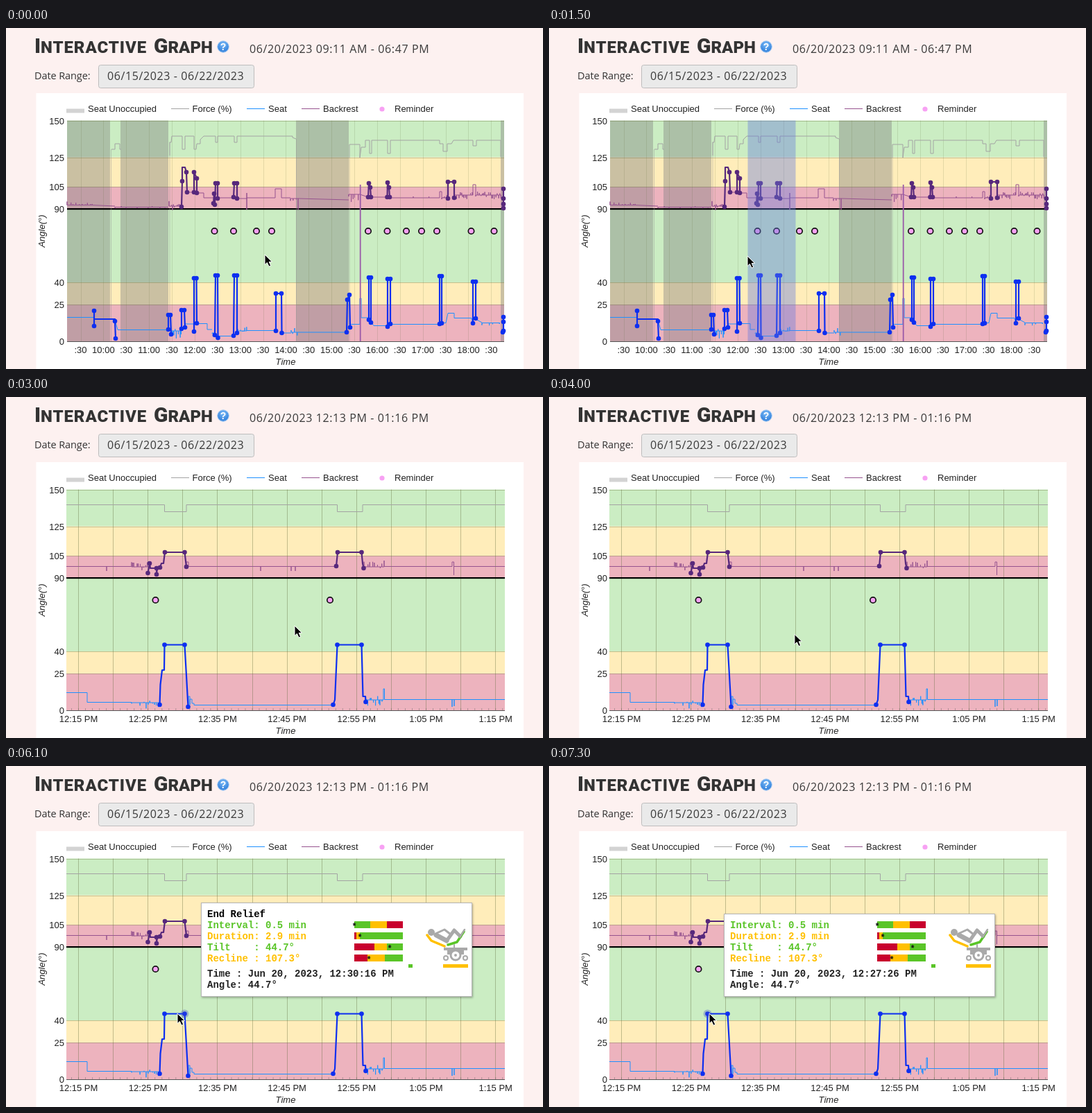
Write an HTML page that moves like this. It is 774 by 492 pixels and loops after 7400 ms.

```html
<!DOCTYPE html>
<html lang="en">
<head>
<meta charset="utf-8">
<title>Interactive Graph</title>
<style>
html, body { margin: 0; width: 100%; height: 100%; overflow: hidden; background: #fdf1f0; }
svg { display: block; width: 774px; height: 492px; font: 13px "Liberation Sans", Arial, sans-serif; fill: #222; }
.title { font: 900 24px Roboto, sans-serif; fill: #333; }
.big { font-size: 30px; }
.info { font: 16px "Open Sans", sans-serif; letter-spacing: .6px; fill: #3a3a3a; }
.label { font: 14.5px "Open Sans", sans-serif; letter-spacing: -.1px; fill: #333; }
.mid { text-anchor: middle; }
.end { text-anchor: end; }
.axis { font-style: italic; }
.tip text { font: bold 14px "Liberation Mono", "Courier New", monospace; white-space: pre; }
.thin { fill: none; stroke-width: 1; }
.thick { fill: none; stroke-width: 2.2; stroke-linejoin: round; }
</style>
</head>
<body>
<svg id="stage" viewBox="0 0 774 492"></svg>
<script>
const GRAY = '#a3a3a3', SKY = '#1e90ff', BLUE = '#0d2ff0', MAUVE = '#96538f', PURPLE = '#57287c';
const RED = '#c8002d', AMBER = '#ffc000', GREEN = '#5ac528';
const TOP = 133.5, BOTTOM = 452;
const yOf = angle => BOTTOM - angle * (BOTTOM - TOP) / 150;

let seed = 7;
const random = () => (seed = seed * 16807 % 2147483647) / 2147483647;

const rect = (x, y, w, h, fill, more = '') => `<rect x="${x}" y="${y}" width="${w}" height="${h}" fill="${fill}" ${more}/>`;
const text = (x, y, s, cls = '', more = '') => `<text x="${x}" y="${y}" class="${cls}" ${more}>${s}</text>`;
const circle = (x, y, r, fill, more = '') => `<circle cx="${x}" cy="${y}" r="${r}" fill="${fill}" ${more}/>`;
const thin = (color, d, more = '') => `<path class="thin" stroke="${color}" d="${d}" ${more}/>`;

// Path commands for a flat line with random spikes above and below it.
function jitter(x0, x1, base, up, down, step) {
  let d = `M${x0} ${base}`;
  for (let x = x0; x < x1; x += step * (.5 + random())) {
    d += `H${x.toFixed(1)}V${(base - up + random() * (up + down)).toFixed(1)}V${base}`;
  }
  return d + `H${x1}`;
}

// Thick polyline with dots; a point marked with ~ has no dot.
function run(color, points) {
  const list = points.split(' ');
  const dots = list.filter(p => p[0] !== '~').map(p => circle(...p.split(','), 3.3, color));
  return `<polyline class="thick" stroke="${color}" points="${points.replaceAll('~', '')}"/>${dots.join('')}`;
}
const runs = (color, list) => list.map(p => run(color, p)).join('');
const reminders = xs => xs.map(x => circle(x, 293, 4.2, '#f7a1f3', 'stroke="#111" stroke-width="1.7"')).join('');

function plot(x0, x1, gridStart, gridStep, gridAlpha, shades = []) {
  const bands = [[125, 150, '#cbedc3'], [105, 125, '#ffedba'], [90, 105, '#edb3be'],
                 [40, 90, '#cbedc3'], [25, 40, '#ffedba'], [0, 25, '#edb3be']];
  let out = bands.map(([a, b, c]) => rect(x0, yOf(b), x1 - x0, yOf(a) - yOf(b), c)).join('');
  out += shades.map(([a, b]) => rect(a, TOP, b - a, BOTTOM - TOP, 'rgba(130,130,130,.42)')).join('');
  let grid = '';
  for (const a of [150, 125, 105, 40, 25]) grid += `M${x0} ${Math.round(yOf(a)) + .5}H${x1}`;
  out += thin('rgba(105,115,60,.38)', grid);
  grid = '';
  for (let x = gridStart; x < x1; x += gridStep) grid += `M${Math.round(x) + .5} ${TOP}V${BOTTOM}`;
  out += thin(`rgba(95,105,60,${gridAlpha})`, grid);
  out += thin('#555', `M${x0} 452.5H${x1}`);
  return out + rect(x0, 260, x1 - x0, 2.2, '#000');
}

function overview() {
  let out = plot(88, 718, 107.5, 32.88, .17, [[88, 150], [165, 234], [418, 494], [713, 718]]);
  for (let i = 0; i < 19; i++) {
    out += text(107.5 + i * 32.88, 469, i % 2 ? `${10 + (i - 1) / 2}:00` : ':30', 'mid');
  }
  out += thin('rgba(150,150,150,.45)', 'M151.5 175V452M236 164V452M418.5 160V452M495 187V452');
  out += thin(GRAY, 'M152 175H157V167H164V175H166M236 184V165H238L239 156H254V175H258V156H271V175H274L275 167H280V161L285 156' +
    'H302V165H305V156H329V165H333V156H413V158L418 160M495 187V168H510V187L512 172H518V162H524V181H527V162' +
    'H550V181H554V162H625V167H630V178H636V167H642L645 162H673V170H678V162H713V186');
  out += thin(MAUVE, jitter(88, 125, 255.5, 5, 0, 4) + 'L157 257' + jitter(157, 234, 258.5, 2, 2, 7) +
    jitter(235, 253, 257, 8, 7, 2) + 'M261 237H271M275 238H285V245H299M306 245H328M334 246H347V238V262V245H388V232H397V245H410' +
    jitter(410, 421, 246, 3, 4, 4) + 'V262V246L494 248' + jitter(494, 510, 240, 6, 12, 3) + 'M510 240L522 244H550' +
    jitter(554, 624, 245, 2, 0, 25) + 'H625V236H628V245' + jitter(628, 637, 245, 5, 2, 3) +
    jitter(646, 673, 241, 4, 7, 2.5) + 'V226H677V241' + jitter(677, 714, 241, 5, 6, 1.8));
  out += thin(SKY, 'M88 417.5H127M158 425L161 435.5H234' + jitter(238, 253, 437, 6, 11, 2) + 'M258 432V427H271M275 426.5H290V435H297' +
    jitter(297, 301, 440, 8, 9, 1.3) + 'M306 444.5H328' + jitter(334, 347, 437, 8, 4, 2.5) + 'V436.5H389M397 440H411' +
    jitter(411, 420, 439, 7, 7, 3) + 'H491M496 427.5H510V390H512V418H523M526 424L530 429.5H550M554 427.5H625' +
    'M628 425.5H634L637 411.5H646V418.5H671L673 426M677 420L686 425' + jitter(686, 712, 425.5, 5, 4, 9));
  out += rect(509.8, 226, 1.8, 226, '#9a5aa8');
  out += runs(PURPLE, ['253,258 254,221 ~254,201 ~258,201 260,208 261,237', '271,237 271,208 275,217 275,238',
    '300,239 299,253 301,255 302,224 305,224 305,246', '328,244 329,224 333,224 333,246',
    '522,244 523,224 525,230 526,244', '549.5,244 550,223 552,230 553,244',
    '637,246 637,222 646,222 646,245', '717,232 717,246 717,254 717,260']);
  out += runs(BLUE, ['127,408 127,430 ~127,420 ~157,420 157,423 158,448', '234,435 234,414 237,414 238,442',
    '253,434 253,407 257,407 258,432', '271,438 271,361 274.5,361 275,426', '301,443 302,357 305,357 305.5,447',
    '328,444 329,357 333,357 333,440', '389,437 389,383 397,383 397.5,440', '491,439 492,392 495,385 496,432',
    '523,421 523,360 526,360 526,425', '550,431 550,362 554,362 554,427', '625,427 625,358 628,358 628,426',
    '673,426 673,366 677,366 677,419', '717,417 717,424 717,437 716,439']);
  return out + reminders([300.5, 328, 361, 383, 522, 549.5, 577, 599, 621, 670.5, 703.5]);
}

function detail() {
  let out = plot(87, 719, 104, 50.1, .38);
  const labels = ['12:15', '12:25', '12:35', '12:45', '12:55', '1:05', '1:15'];
  out += labels.map((s, i) => text(104.5 + i * 100.2, 469, s + ' PM', 'mid')).join('');
  let ticks = '';
  for (let x = 94.5; x < 719; x += 10.02) ticks += `M${x.toFixed(1)} 449V452`;
  out += thin('rgba(90,90,90,.4)', ticks);
  out += thin(GRAY, 'M87 155.5H228.5V165.5H260V155.5H477.5V165.5H514V155.5H719');
  out += thin(MAUVE, 'M87 244.5H145V251V244.5H181' + jitter(181, 206, 245, 7, 5, 2.5) +
    'M260 243V238H263V244.5H367V251V244.5H411V251V244.5H417V251V244.5H476' +
    jitter(516, 545, 245, 9, 2, 4) + 'M545 244.5H643V238H645.5V257V244.5H719');
  out += thin(SKY, 'M87 426.5H117V440.5H181' + jitter(181, 199, 441, 2, 6, 6) + jitter(199, 221, 441, 9, 9, 2.2) +
    'M263 447V432H265V444V436H268V442H271V444.5H471' + jitter(519, 544, 437, 9, 9, 2.4) +
    'V421H545.5V436.5H643V447V436.5H646V446V436.5H719');
  out += runs(PURPLE, ['204.5,254 207,240 ~208,247 217,247 217,256 ~218,247 222,246 ~224,240 ~227,240 229,224 257.5,224 260,245',
    '476,244 478,224 512.5,224 ~514,240 515.5,247']);
  out += runs(BLUE, ['221.5,444 ~222.5,415 ~225,394 ~228,394 228.5,357.5 257.5,357.5 262.5,447',
    '471.5,444 ~474,437 477.5,357.5 512.5,357.5 ~514.5,432 ~518,432 518.5,440']);
  return out + reminders([215.5, 467]);
}

function chair() {
  const line = (color, w, d) => `<path d="${d}" fill="none" stroke="${color}" stroke-width="${w}" stroke-linecap="round" stroke-linejoin="round"/>`;
  const g = '#a9a9a9';
  return circle(613, 240, 5, g) + line(g, 7, 'M620 244L635 252') + line(g, 5, 'M636 251L646 237L655 246') +
    line(g, 3, 'M621 241L632 236L641 243') + line(AMBER, 3.5, 'M607 244L613 252L632 260') +
    line(GREEN, 3.5, 'M637 258L650 254L660 239') + line(g, 2.5, 'M654 247L661 236') +
    rect(631, 262, 34, 4, g) + line(g, 2, 'M646 258V263') + rect(636, 265, 24, 7, g) +
    circle(648, 273, 7, '#fff', `stroke="${g}" stroke-width="3"`) + circle(648, 273, 2, g) +
    circle(634, 277, 3, '#fff', `stroke="${g}" stroke-width="2"`) + circle(662, 277, 3, '#fff', `stroke="${g}" stroke-width="2"`) +
    rect(580, 286, 6, 5, GREEN) + rect(630, 286, 36, 5, AMBER);
}

function tooltip(id, dx, top, heading, time) {
  const rows = [['Interval: 0.5 min', GREEN, 502, [[GREEN, 23], [AMBER, 24], [RED, 23]]],
                ['Duration: 2.9 min', AMBER, 510, [[RED, 3], [AMBER, 5], [GREEN, 62]]],
                ['Tilt    : 44.7°', GREEN, 553, [[RED, 29], [AMBER, 18], [GREEN, 23]]],
                ['Recline : 107.3°', AMBER, 523, [[RED, 19], [AMBER, 25], [GREEN, 26]]]];
  let out = rect(281.5, top, 390, 332.5 - top, '#fff', 'stroke="#b5b5b5" filter="url(#shadow)"');
  if (heading) out += text(290, 218, heading, '', 'style="fill:#000"');
  rows.forEach(([label, color, mark, parts], i) => {
    const y = 224 + i * 16;
    out += text(290, y + 10, label, '', `style="fill:${color}"`);
    let x = 502;
    for (const [c, w] of parts) { out += rect(x, y, w, 10, c); x += w; }
    out += text(mark, y + 11, '*', 'mid', 'style="font-size:12px;fill:#111"');
  });
  out += text(290, 304, `Time : Jun 20, 2023, ${time} PM`) + text(290, 320, 'Angle: 44.7°');
  return `<g id="${id}" class="tip" transform="translate(${dx} 0)">${circle(257.5, 357.5, 6, 'rgba(60,70,200,.32)')}${out}${chair()}</g>`;
}

function frame() {
  const key = (x, color) => thin(color, `M${x} 116.5H${x + 26}`);
  let out = rect(0, 0, 774, 492, '#fdf1f0') + rect(43.5, 94, 702.5, 398, '#fff');
  out += `<text class="title" y="36"><tspan class="big" x="41">I</tspan><tspan letter-spacing=".9">NTERACTIVE</tspan> ` +
    `<tspan class="big" x="213">G</tspan><tspan>RAPH</tspan></text>`;
  out += circle(313, 27, 8.3, 'url(#help)', 'stroke="#a9cdf3" stroke-width="1"') +
    text(313, 32, '?', 'mid', 'style="font-weight:bold;font-size:14px;fill:#fff"');
  out += text(351, 36, '', 'info', 'id="span"') + text(41, 74, 'Date Range:', 'label');
  out += rect(133.5, 53.5, 224, 33, '#eaeaea', 'rx="3" stroke="#bdbdbd"') + text(146, 74.5, '06/15/2023 - 06/22/2023', 'info');
  out += rect(87, 116.5, 26, 6, '#d3d3d3') + key(238, GRAY) + key(347, SKY) + key(426, MAUVE) + circle(542, 117, 3.6, '#f7a1f3');
  out += text(118, 121, 'Seat Unoccupied') + text(268.5, 121, 'Force (%)') + text(378, 121, 'Seat') +
    text(457, 121, 'Backrest') + text(560, 121, 'Reminder');
  for (const a of [150, 125, 105, 90, 40, 25, 0]) out += text(84, yOf(a) + 5, a, 'end');
  out += text(0, 0, 'Angle(°)', 'mid axis', 'transform="translate(56 293) rotate(-90)"');
  return out + text(403, 486, 'Time', 'mid axis');
}

const stage = document.getElementById('stage');
stage.innerHTML = `<defs>
  <radialGradient id="help" cy=".3"><stop offset="0" stop-color="#7fbdf8"/><stop offset="1" stop-color="#3f8be0"/></radialGradient>
  <filter id="shadow"><feDropShadow dx="1" dy="1.5" stdDeviation="1.5" flood-opacity=".3"/></filter></defs>` +
  frame() + `<g id="overview">${overview()}</g><g id="detail">${detail()}</g>` +
  rect(0, TOP, 0, BOTTOM - TOP, 'rgba(100,120,220,.4)', 'id="selection"') +
  tooltip('tipEnd', 0, 197.5, 'End Relief', '12:30:16') + tooltip('tipStart', -29, 213.5, '', '12:27:26') +
  '<path id="cursor" d="M0 0V14.5L3.4 11.4L6 17.2L8.7 16L6.2 10.4H10.6Z" fill="#000" stroke="#fff" stroke-width="1"/>';

const part = id => document.getElementById(id);
const show = (id, on) => part(id).setAttribute('display', on ? 'inline' : 'none');

const LOOP = 7400, ZOOM = 2500, DRAG_X = 355.5;
// Pointer path: time, x, y.
const PATH = [[0, 373, 327], [300, 355.5, 328], [900, 304, 329], [1400, 286, 329], [2500, 286, 329], [3000, 416, 330],
              [3500, 416, 332], [4700, 267, 357], [5100, 267, 357], [5700, 247, 357], [6300, 247, 357], [6800, 231, 357], [LOOP, 231, 357]];

function pointer(t) {
  const i = PATH.findIndex(p => p[0] > t);
  const [t0, x0, y0] = PATH[i - 1], [t1, x1, y1] = PATH[i];
  const k = (t - t0) / (t1 - t0);
  return [x0 + (x1 - x0) * k, y0 + (y1 - y0) * k];
}

function draw(now) {
  const t = Math.floor(now % LOOP / 100) * 100;
  const [x, y] = pointer(t);
  const zoomed = t >= ZOOM, dragging = t > 300 && !zoomed;
  const hover = t > 5100;
  show('overview', !zoomed);
  show('detail', zoomed);
  show('selection', dragging);
  part('selection').setAttribute('x', x + .5);
  part('selection').setAttribute('width', Math.max(0, DRAG_X - x - .5));
  show('tipEnd', hover && x >= 243);
  show('tipStart', hover && x < 243);
  part('span').textContent = '06/20/2023 ' + (zoomed ? '12:13 PM - 01:16 PM' : '09:11 AM - 06:47 PM');
  part('cursor').setAttribute('transform', `translate(${x} ${y})`);
}

const start = performance.now();
function tick() {
  draw(performance.now() - start);
  requestAnimationFrame(tick);
}
tick();
</script>
</body>
</html>
```
